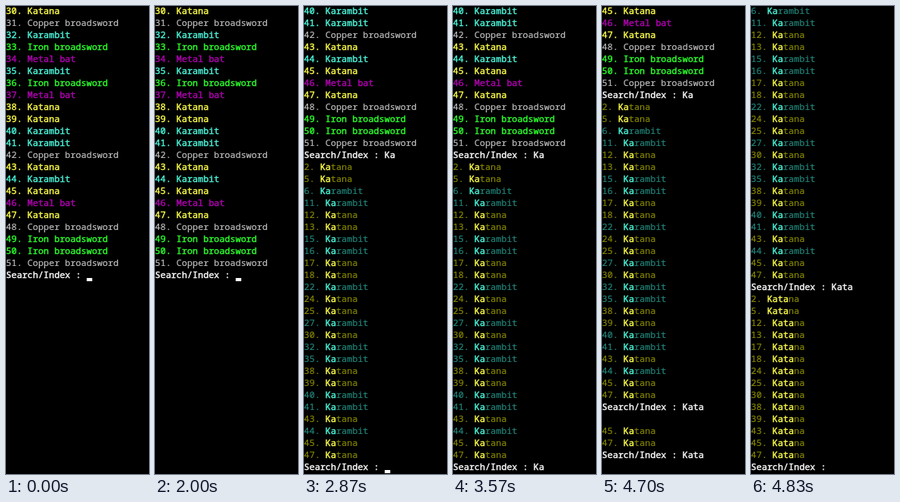
An HTML page that plays this animation: 179x585 px, repeating every 5430 ms.

```html
<!DOCTYPE html>
<html lang="en">
<head>
<meta charset="utf-8">
<title>Inventory search</title>
<style>
html, body { margin: 0; width: 100%; height: 100%; overflow: hidden; background: #000; }
#screen {
  position: absolute; left: 0; top: -2px;
  font: 11.2px/15px "Noto Sans Mono", "DejaVu Sans Mono", monospace;
  font-variant-ligatures: none; color: #fff;
  -webkit-text-stroke: .4px;
}
#screen div { height: 15px; white-space: pre; }
#cursor { position: absolute; width: 7px; height: 4px; background: #fff; }
.dim, .C { -webkit-text-stroke-width: .2px; }
.K { color: #ffff4c; } .K.dim { color: #868600; }
.R { color: #4cf8dc; } .R.dim { color: #20857a; }
.I { color: #2cff2c; }
.M { color: #b000b0; }
.C { color: #bcbcbc; }
</style>
</head>
<body>
<div id="screen"></div>
<div id="cursor"></div>
<script>
const LOOP = 5430, FPS = 30, ROWS = 39, PITCH = 15, CHAR = 6.72;
const KEY_GAP = 130, PRINT_TIME = 180, BLINK = 530;
const PROMPT = 'Search/Index : ';
const names = { K: 'Katana', R: 'Karambit', I: 'Iron broadsword', M: 'Metal bat', C: 'Copper broadsword' };

// One letter per inventory slot; a dot is a slot that is never shown.
const slots = [...'..K..KR....RKK.RRKK...R.KK.R..' + 'KCRIMRIMKKRRCKRKMKCIIC'];

// Keys come in pairs; "pairs" holds the time of each pair's first key.
const turns = [
  { query: 'Ka', pairs: [2200], enter: 2456 },
  { query: 'Kata', pairs: [3300, 4300], enter: 4600 },
  { query: '', pairs: [], enter: Infinity }
];

const span = (cls, text) => `<span class="${cls}">${text}</span>`;
const search = query => slots.flatMap((k, i) => {
  const name = names[k];
  if (!query || !name?.startsWith(query)) return [];
  return span(k + ' dim', `${i}. `) + span(k, query) + span(k + ' dim', name.slice(query.length));
});

const log = slots.map((k, i) => span(k, `${i}. ${names[k]}`)).slice(30);
for (const turn of turns) {
  turn.row = log.length;
  turn.hits = search(turn.query);
  log.push(PROMPT + turn.query, ...turn.hits);
}

const screen = document.getElementById('screen');
const cursor = document.getElementById('cursor');
const clamp = (x, lo, hi) => Math.min(hi, Math.max(lo, x));
const topOf = active => Math.max(0, active - ROWS + 1);
const view = (active, line) => [...log.slice(topOf(active), active), line];

function typed(turn, t) {
  const count = turn.pairs.reduce((n, at) => n + clamp(Math.floor((t - at) / KEY_GAP) + 1, 0, 2), 0);
  return PROMPT + turn.query.slice(0, count);
}

function render(t) {
  const turn = turns.find(u => t < u.enter + PRINT_TIME);
  const p = (t - turn.enter) / PRINT_TIME;
  let active = turn.row, line = '', rows;
  if (p < 0) {
    line = typed(turn, t);
    rows = view(active, line);
  } else {
    const first = turn.row + 1;
    active = first + Math.floor(turn.hits.length * p * p);
    rows = view(active, '');
    // The window scrolls first; rows below the prompt are repainted later.
    if (p < 0.6) {
      const split = first - topOf(active);
      rows = [...rows.slice(0, split), '', ...view(first, '').slice(split + 1)];
    }
  }
  screen.innerHTML = rows.map(r => `<div>${r}</div>`).join('');
  cursor.style.left = Math.round(line.length * CHAR) + 'px';
  cursor.style.top = (active - topOf(active)) * PITCH + 10 + 'px';

  const idle = t < 2200 || t > 3500;
  cursor.hidden = t > 4620 || idle && (t + 675) % (2 * BLINK) < BLINK;
}

let shown;
function frame(now) {
  const tick = Math.floor((now % LOOP + 4) * FPS / 1000);
  if (tick !== shown) render((shown = tick) * 1000 / FPS);
  requestAnimationFrame(frame);
}
frame(0);
</script>
</body>
</html>
```
